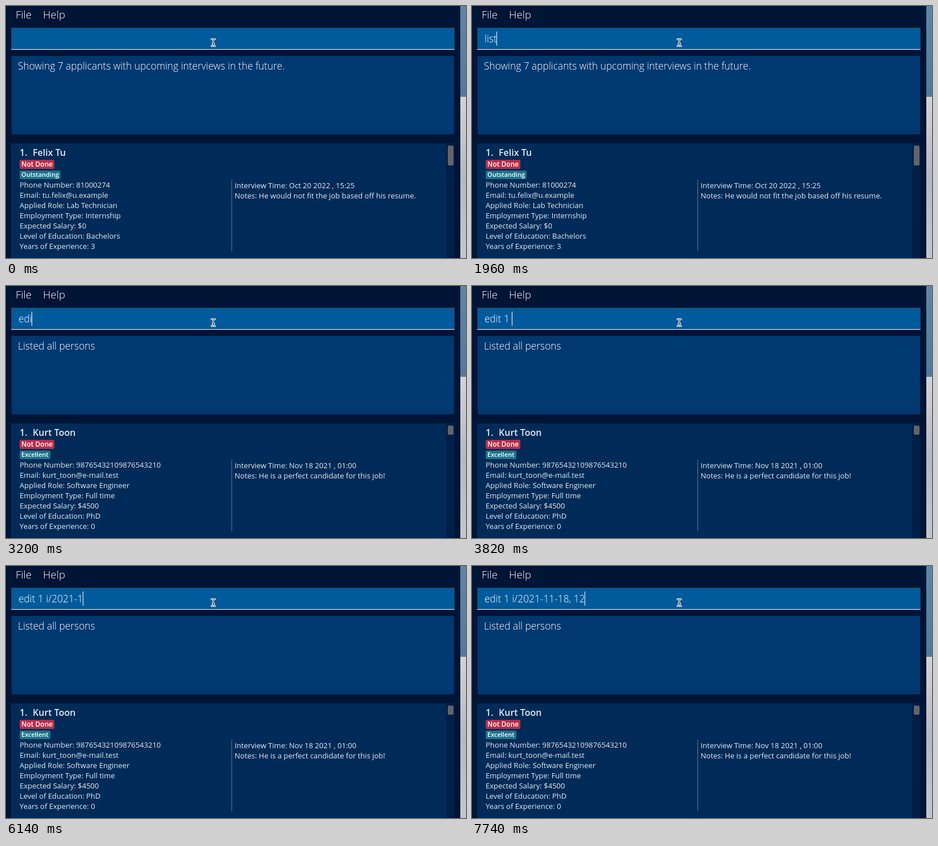
An HTML page for the animation above (8 s loop, 809 by 444 pixels).

```html
<!DOCTYPE html>
<html lang="en">
<head>
<meta charset="utf-8">
<title>Applicant list</title>
<style>
html, body { margin: 0; width: 100%; height: 100%; overflow: hidden; background: #001436; }
svg { display: block; }
text { font-family: "Open Sans", sans-serif; font-size: 13px; fill: #e8ebef; white-space: pre; }
.menu { font-size: 18.67px; font-weight: 300; fill: #fff; }
.big { font-size: 17.33px; font-weight: 300; fill: #fff; }
.name { font-size: 16px; font-weight: 600; }
.state { font-size: 12px; font-weight: 600; fill: #fff; }
.tag { font-size: 11px; font-weight: 600; fill: #fff; }
</style>
</head>
<body>
<svg width="809" height="444" viewBox="0 0 809 444">
  <defs>
    <linearGradient id="sky" x2="0" y2="1"><stop stop-color="#5f86a6"/><stop offset="1" stop-color="#55799a"/></linearGradient>
    <linearGradient id="wall" x2="0" y2="1"><stop stop-color="#d3d4d6"/><stop offset=".5" stop-color="#b3b9c2"/><stop offset="1" stop-color="#c3c7cd"/></linearGradient>
  </defs>
  <rect x="799" width="10" height="160" fill="url(#sky)"/>
  <rect x="799" y="160" width="10" height="284" fill="url(#wall)"/>

  <text class="menu" x="17" y="22">File</text>
  <text class="menu" x="65" y="22">Help</text>

  <rect x="9" y="38" width="780" height="39" fill="#383838"/>
  <rect x="10" y="39" width="778" height="37" fill="#005a9b"/>
  <rect x="9" y="76" width="780" height="1" fill="#fff"/>
  <text class="big" id="command" x="22" y="64"></text>
  <rect id="caret" y="45" width="1" height="25" fill="#fff"/>

  <rect x="10" y="88" width="778" height="138" fill="#003870"/>
  <text class="big" id="result" x="21" y="112"></text>

  <rect x="9" y="242" width="780" height="202" fill="#001f47"/>
  <rect x="9" y="242" width="765" height="202" fill="#002b58"/>
  <rect id="thumb" x="777" y="246" width="10" rx="2" fill="#646467"/>
  <text class="name" x="24" y="264">1.</text>
  <text class="name" id="name" x="47" y="264"></text>
  <rect x="24" y="271" width="61" height="16" rx="2" fill="#b82e49"/>
  <text class="state" x="27" y="283">Not Done</text>
  <rect id="badge" x="24" y="290" height="15" rx="2" fill="#1d7389"/>
  <text class="tag" id="tag" x="27" y="301"></text>
  <g id="details"></g>
  <rect x="396" y="306" width="2" height="126" fill="#33527a"/>

  <g fill="none" stroke-linecap="square">
    <path id="beam" d="M362 58.5h1.5l1 1 1-1h1.500M364.500 60v8M362 70.500h1.500l1-1 1 1h1.500M363.500 66.500h2" stroke="#fff" stroke-width="3"/>
    <use href="#beam"/>
    <path d="M362 58.500h1.500l1 1 1-1h1.500M364.500 60v8M362 70.500h1.500l1-1 1 1h1.500M363.500 66.500h2" stroke="#111" stroke-width="1"/>
  </g>
</svg>
<script>
const LOOP = 8000, ENTER = 2490;
const $ = id => document.getElementById(id);

const before = {
  result: "Showing 7 applicants with upcoming interviews in the future.",
  name: "Felix Tu", tag: "Outstanding", badge: 72, thumb: 35,
  left: ["81000274", "tu.felix@u.example", "Lab Technician", "Internship", "$0", "Bachelors", "3"],
  right: ["Oct 20 2022 , 15:25", "He would not fit the job based off his resume."]
};
const after = {
  result: "Listed all persons",
  name: "Kurt Toon", tag: "Excellent", badge: 54, thumb: 16,
  left: ["98765432109876543210", "kurt_toon@e-mail.test", "Software Engineer", "Full time", "$4500", "PhD", "0"],
  right: ["Nov 18 2021 , 01:00", "He is a perfect candidate for this job!"]
};
const leftLabels = ["Phone Number", "Email", "Applied Role", "Employment Type",
  "Expected Salary", "Level of Education", "Years of Experience"];
const rightLabels = ["Interview Time", "Notes"];

// Each step: start time, typed text, caret hidden
const steps = [
  [0, "", true], [540, ""], [980, "", true],
  [1520, "l"], [1610, "li"], [1690, "lis"], [1960, "list"], [ENTER, ""],
  [2850, "e"], [3110, "ed"], [3200, "edi"], [3290, "edit"], [3470, "edit "],
  [3740, "edit 1"], [3820, "edit 1 "], [4360, "edit 1 ", true],
  [4540, "edit 1 i"], [5080, "edit 1 i/"], [5520, "edit 1 i/2"],
  [5700, "edit 1 i/20"], [5790, "edit 1 i/202"], [5870, "edit 1 i/2021"],
  [5960, "edit 1 i/2021-"], [6140, "edit 1 i/2021-1"], [6320, "edit 1 i/2021-11"],
  [6410, "edit 1 i/2021-11-"], [6490, "edit 1 i/2021-11-1"],
  [6760, "edit 1 i/2021-11-18"], [6850, "edit 1 i/2021-11-18 "],
  [7120, "edit 1 i/2021-11-18"], [7380, "edit 1 i/2021-11-18, "],
  [7650, "edit 1 i/2021-11-18, 1"], [7740, "edit 1 i/2021-11-18, 12"]
];

const lines = (labels, values, x, y) => labels.map((label, i) =>
  `<text x="${x}" y="${y + 18 * i}">${label}: ${values[i]}</text>`).join("");

function showPage(page) {
  for (const id of ["result", "name", "tag"]) $(id).textContent = page[id];
  $("badge").setAttribute("width", page.badge);
  $("thumb").setAttribute("height", page.thumb);
  $("details").innerHTML = lines(leftLabels, page.left, 24, 320) + lines(rightLabels, page.right, 402, 321);
}

function showStep([, text, hidden]) {
  const command = $("command"), caret = $("caret");
  command.textContent = text;
  const width = text ? command.getComputedTextLength() : 0;
  caret.setAttribute("x", Math.round(21.5 + width));
  caret.setAttribute("visibility", hidden ? "hidden" : "visible");
}

let page, step;
function frame() {
  const t = performance.now() % LOOP;
  const nextPage = t < ENTER ? before : after;
  const nextStep = steps.findLast(s => s[0] <= t);
  if (nextPage !== page) showPage(page = nextPage);
  if (nextStep !== step) showStep(step = nextStep);
  requestAnimationFrame(frame);
}
frame();
</script>
</body>
</html>
```
